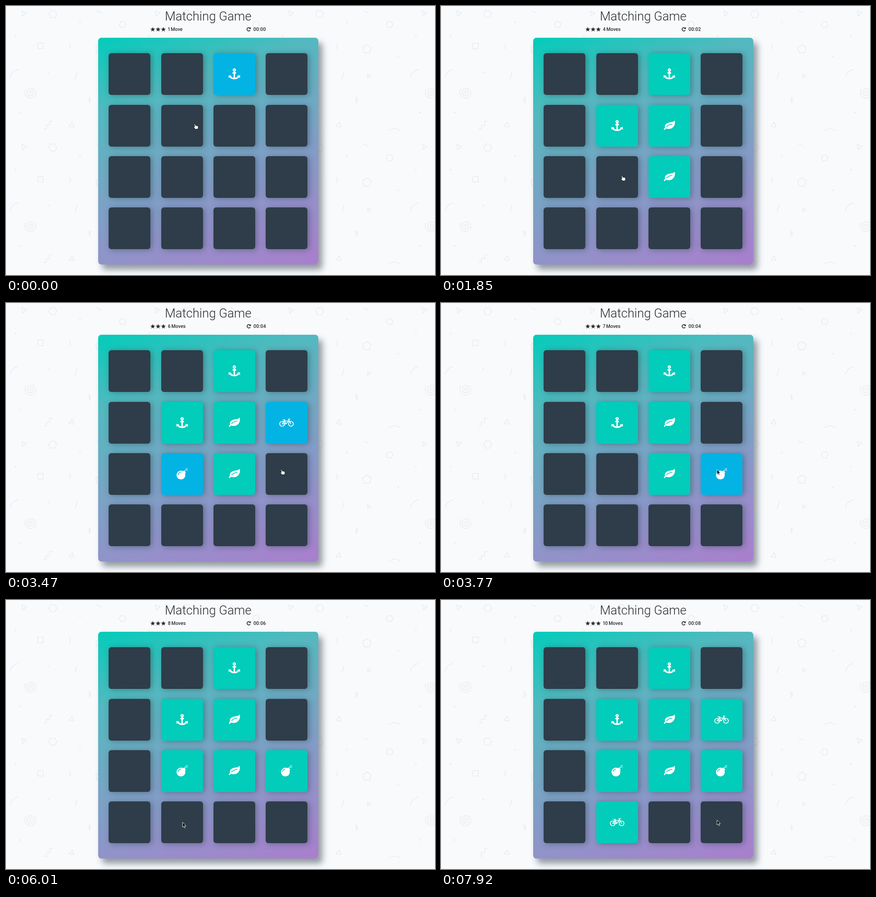
Animation, 945 px wide and 593 px high, one loop 8000 ms. Source, as an HTML page:

```html
<!DOCTYPE html>
<html lang="en">
<head>
<meta charset="utf-8">
<title>Matching Game</title>
<style>
  html, body { margin: 0; width: 100%; height: 100%; overflow: hidden; background: #f8fafc; }
  svg { position: absolute; left: 0; top: 0; overflow: visible; }
  text { fill: #2b2d2f; font: 500 10.6px Roboto, sans-serif; font-variant-numeric: proportional-nums; word-spacing: -1px; }
  text.title { font: 300 27.3px Roboto, sans-serif; word-spacing: 0; }
  #board {
    position: absolute; left: 203px; top: 70px; width: 485px; height: 500px; border-radius: 7px;
    background: linear-gradient(160deg, #02ccba, #52b9bf, #75a6c4, #9292c9, #aa7ecd);
    box-shadow: 8.8px 11px 14px rgba(46, 61, 73, .5);
  }
  .card {
    position: absolute; width: 92px; height: 92px; border-radius: 6px;
    background: #2e3d49; box-shadow: 3.7px 1.5px 13px rgba(46, 61, 73, .45);
  }
  .card svg { left: 46px; top: 46px; display: none; }
  .open { background: #02b3e4; color: #02b3e4; }
  .match { background: #02ccba; color: #02ccba; }
  .open svg, .match svg { display: block; }
  .line { fill: none; stroke: #fff; stroke-linecap: round; stroke-linejoin: round; }
</style>
</head>
<body>
<svg width="945" height="593">
  <defs>
    <pattern id="doodles" width="294" height="294" patternUnits="userSpaceOnUse">
      <g fill="none" stroke="#eaecef" stroke-width="1.6">
        <path id="shapes"/>
        <path d="M200 10l11 6 M139 82q6 6 1 13 M9 158q3-15 18-18 M157 144l-5 17"/>
        <path d="M182 202l4 2l-4 3l5 2l-4 3l3 2 M83 271h6v-8h7v-9h7 M256 275q12-9 25 0"/>
        <path d="M21 67h.1 M93 146h.1 M163 36h.1 M276 112h.1 M30 235h.1" stroke-width="3.6" stroke-linecap="round"/>
      </g>
    </pattern>
    <g id="anchor">
      <g class="line" stroke-width="3.2">
        <circle cy="-9" r="2.3" stroke-width="2.6"/>
        <path d="M0-6V9 M-4-2.5H4 M-9.500 5Q-7 10 0 10T9.500 5" stroke-linecap="butt"/>
      </g>
      <path fill="#fff" d="M-12.500 2.500v6.500l6.500-5Z M12.500 2.500v6.500l-6.500-5Z"/>
    </g>
    <g id="leaf">
      <path fill="#fff" d="M12-11.500C14-3 9 7-1 7Q-5 7-7.500 6L-10.500 9.500L-12.500 7.500L-9.500 4C-12-5-1-7.500 5-8Q9-8.500 12-11.500Z"/>
      <path fill="none" stroke="currentColor" stroke-width="1.6" stroke-linecap="round" d="M-6 2Q-1-3 6-3.500"/>
    </g>
    <g id="bomb">
      <circle cx="-2.600" cy="2.300" r="9.700" fill="#fff"/>
      <path fill="#fff" d="M1-6l3-1.500l4 4l-2 3Z"/>
      <path class="line" stroke-width="1.200" d="M5.500-5.500Q6-9 8.500-8.500 M8.500-12v1.500 M11.500-12l-1.200 1.400 M11.500-7.500l-1-.6"/>
      <path fill="none" stroke="currentColor" stroke-width="1.300" stroke-linecap="round" d="M-9 1.500Q-8-3-3.500-4"/>
    </g>
    <g id="bicycle" class="line" stroke-width="1.700">
      <circle cx="-9.700" cy="2.300" r="5.300"/><circle cx="9.700" cy="2.300" r="5.300"/>
      <path d="M-9.700 2.300L-5-4H5L-1 2.300H-9.700 M-1 2.300L-5.500-6.500h-2.500h4.500 M9.700 2.300L4-8h3.500"/>
    </g>
  </defs>
  <rect width="945" height="593" fill="url(#doodles)"/>
  <text class="title" x="445.300" y="32" text-anchor="middle">Matching Game</text>
  <path id="stars" fill="#2b2d2f"/>
  <text id="moves" x="356.500" y="55"></text>
  <g id="reload">
    <path fill="none" stroke="#2b2d2f" stroke-width="1.700" d="M7.500 48.800A3.700 3.700 0 1 0 8 53.200"/>
    <path fill="#2b2d2f" d="M9.500 46.500v4.300h-4.300Z"/>
  </g>
  <text id="clock" x="572.500" y="55" text-anchor="end"></text>
</svg>
<div id="board"></div>
<svg width="945" height="593">
  <g id="cursor" stroke-linejoin="round">
    <path id="arrow" fill="#000" stroke="#fff" stroke-width=".9" d="M0 0V10.800L2.500 8.500L4.200 12.400L6 11.600L4.300 7.800H7.500Z"/>
    <path id="hand" fill="#fff" stroke="#000" stroke-width=".8" d="M-2.500.5q1.300-1.200 2 .3l1.300 3q1.300-.8 2 .2q1.200-.6 1.800.4q1.300-.3 1.600 1l.2 3l-1.200 3.200h-5.200l-3.200-4q-.8-1.600.9-1.500l1 .6Z"/>
  </g>
</svg>
<script>
const LOOP = 8000;
const CARD_LEFT = 226.2, CARD_TOP = 104.3, PITCH_X = 115.4, PITCH_Y = 113.2;
const $ = id => document.getElementById(id);

const deck = [
  '', '', 'anchor', '',
  '', 'anchor', 'leaf', 'bicycle',
  '', 'bomb', 'leaf', 'bomb',
  '', 'bicycle', '', '',
];

// Places where the pointer stops; a stop without a click is a pause.
const stops = [
  { arrive: -300, click: 0, x: 503, y: 150 },
  { arrive: 0, click: 140, x: 417, y: 260 },
  { arrive: 600, click: 950, x: 501, y: 266 },
  { arrive: 1250, click: 1550, x: 503, y: 374 },
  { arrive: 1850, click: 2150, x: 400, y: 374 },
  { arrive: 2730, click: 3030, x: 598, y: 278 },
  { arrive: 3470, click: 3770, x: 608, y: 367 },
  { arrive: 4520, x: 332, y: 376 },
  { arrive: 5120, click: 5420, x: 360, y: 379 },
  { arrive: 5710, click: 6160, x: 389, y: 490 },
  { arrive: 6880, click: 7330, x: 629, y: 304 },
  { arrive: 7630, click: LOOP, x: 608, y: 485 },
];
stops.forEach((stop, i) => {
  const previous = stops[i - 1] || stop;
  stop.from = previous;
  stop.depart = Math.max(previous.click ?? previous.arrive, stop.arrive - 450);
});

const ease = p => p * p * (3 - 2 * p);
const clamp = p => Math.min(1, Math.max(0, p));
const mix = (a, b, p) => a + (b - a) * p;

// Closed outline whose corners cycle through the given radii.
function polygon(x, y, sides, turn, ...radii) {
  const corners = Array.from({ length: sides }, (_, i) => {
    const angle = turn + i * 2 * Math.PI / sides, radius = radii[i % radii.length];
    return `${x + radius * Math.cos(angle)} ${y + radius * Math.sin(angle)}`;
  });
  return `M${corners.join('L')}Z`;
}

function spiral(x, y, radius, turns) {
  const points = Array.from({ length: 61 }, (_, i) => {
    const p = i / 60, angle = p * turns * 2 * Math.PI;
    return `${x + radius * p * Math.cos(angle)} ${y + radius * p * Math.sin(angle)}`;
  });
  return 'M' + points.join('L');
}

const UP = -Math.PI / 2;
$('shapes').setAttribute('d', [
  polygon(103, 18, 6, 0, 9), polygon(257, 41, 6, 0, 7.5), polygon(207, 95, 5, UP, 10),
  polygon(76, 88, 4, Math.PI / 4, 8.5), polygon(39, 16, 3, -.2, 6.5),
  polygon(211, 155, 3, 0, 4.5), polygon(145, 263, 3, .7, 6.5), spiral(55, 191, 14, 2.6),
].join(''));
$('stars').setAttribute('d', [0, 1, 2].map(i =>
  polygon(323.3 + i * 11.7, 51.7, 10, UP, 5.5, 2.4)).join(''));

const cards = deck.map((icon, i) => {
  const node = document.createElement('div');
  node.style.left = CARD_LEFT - 203 + i % 4 * PITCH_X + 'px';
  node.style.top = CARD_TOP - 70 + (i >> 2) * PITCH_Y + 'px';
  if (icon) node.innerHTML = `<svg width="1" height="1"><use href="#${icon}"/></svg>`;
  $('board').append(node);
  return node;
});

const cardAt = ({ x, y }) =>
  Math.floor((x - CARD_LEFT) / PITCH_X) + 4 * Math.floor((y - CARD_TOP) / PITCH_Y);

// Replays the clicks: equal pairs stay, unequal pairs close on the next click.
function replay(clicks) {
  const states = deck.map(() => '');
  let turned = [];
  for (const stop of clicks) {
    if (turned.length === 2) {
      for (const card of turned) states[card] = '';
      turned = [];
    }
    const card = cardAt(stop);
    states[card] = 'open';
    turned.push(card);
    if (turned.length === 2 && deck[turned[0]] === deck[card]) {
      for (const matched of turned) states[matched] = 'match';
      turned = [];
    }
  }
  return states;
}

function drawPointer(t) {
  const { from, depart, arrive, click, x, y } = stops.filter(stop => stop.depart <= t).pop();
  const p = ease(clamp((t - depart) / (arrive - depart)));
  $('cursor').setAttribute('transform', `translate(${mix(from.x, x, p)} ${mix(from.y, y, p)})`);
  const hand = click && t >= arrive && t < arrive + 140;
  $('hand').style.display = hand ? '' : 'none';
  $('arrow').style.display = hand ? 'none' : '';
}

function draw(t) {
  const clicks = stops.filter(stop => stop.click <= t);
  replay(clicks).forEach((state, i) => cards[i].className = 'card ' + state);

  $('moves').textContent = clicks.length + (clicks.length === 1 ? ' Move' : ' Moves');
  $('clock').textContent = '00:0' + Math.floor((t + 550) / 1000);
  const reloadX = 572.5 - $('clock').getComputedTextLength() - 15;
  $('reload').setAttribute('transform', `translate(${reloadX} 0)`);
  drawPointer(t);
}

const start = performance.now();
function frame() {
  draw((performance.now() - start) % LOOP);
  requestAnimationFrame(frame);
}
frame();
</script>
</body>
</html>
```
